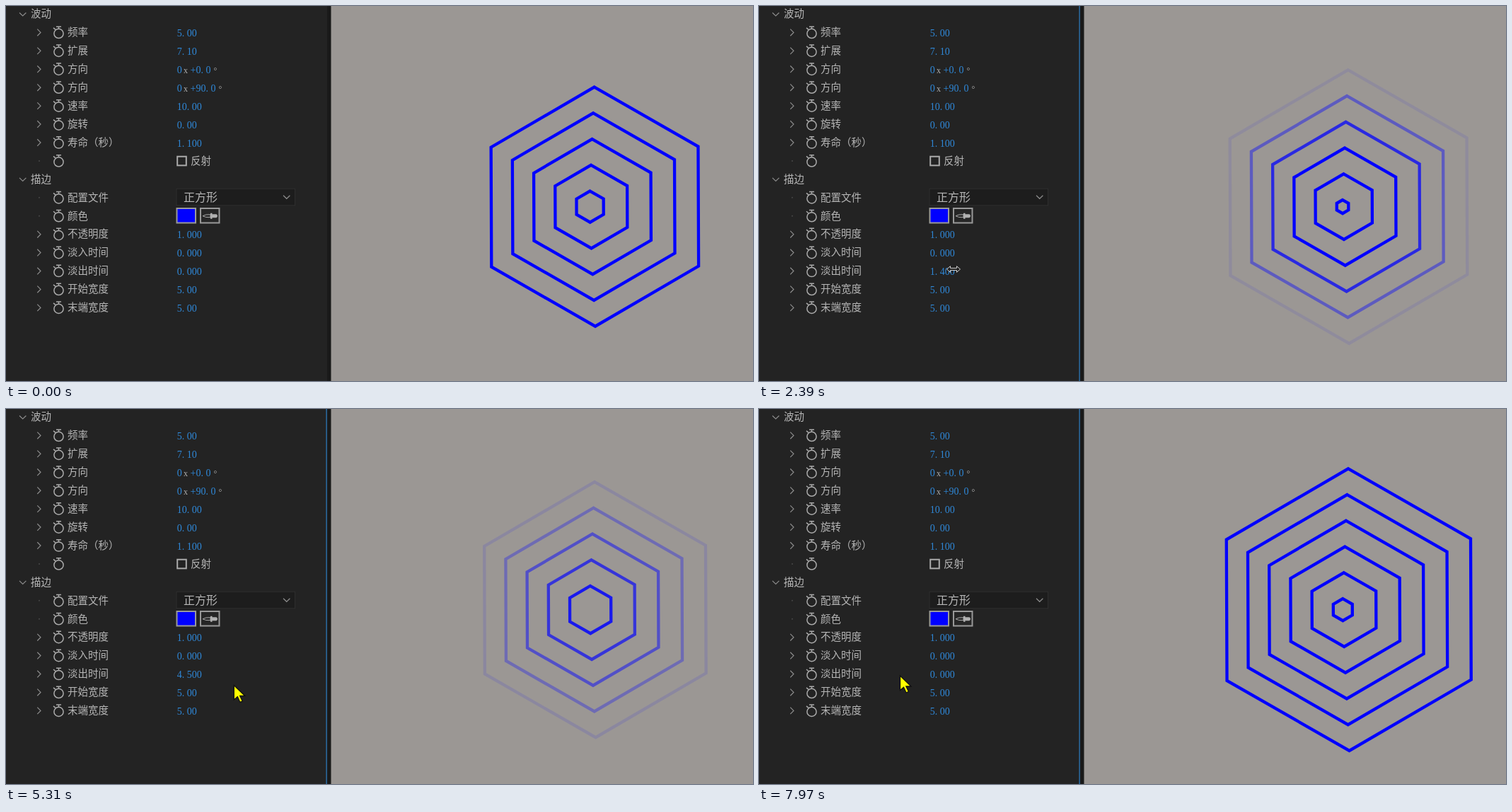
Animation of 1056 by 530 pixels, one loop 8000 ms. Source, as an HTML page:

```html
<!DOCTYPE html>
<html lang="zh-CN">
<head>
<meta charset="utf-8">
<title>波动与描边</title>
<style>
  html, body { margin: 0; width: 100%; height: 100%; overflow: hidden; background: #232323; }
  svg { display: block; width: 1056px; height: 530px; }
  text { font: 300 14.5px "Noto Sans CJK SC", "Noto Sans CJK", sans-serif; fill: #b6b6b6; white-space: pre; }
  .value { font: 14px "Liberation Serif", serif; fill: #2f88d8; }
  .unit { font: 12px "Liberation Serif", serif; fill: #b0b0b0; }
  .dot { letter-spacing: 3.5px; }
  .menu { font-size: 16px; }
  .hover { fill: #f2f2f2; }
  .icon { fill: none; stroke: #aaa; stroke-width: 1.5; }
  .chevron { fill: none; stroke: #8c8c8c; stroke-width: 1.2; }
  .box { stroke: #999; stroke-width: 2; }
  .ring { fill: none; stroke: #00f; stroke-width: 4.3; }
</style>
</head>
<body>
<svg viewBox="0 0 1056 530">
  <rect width="1056" height="530" fill="#232323"/>
  <rect x="454" width="6" height="530" fill="#191919"/>
  <rect x="459.5" width="597" height="530" fill="#9b9794"/>
  <rect id="focus" x="452.5" width="1.2" height="530" fill="#2d7fc4"/>
  <g id="rows"></g>
  <g id="rings"></g>
  <g id="arrow">
    <path d="M0 0V20.5L5 16.2L8.6 24L12 22.4L8.4 15H15.5Z" fill="#ff0" stroke="#111" stroke-width="1.3"/>
  </g>
  <g id="hand">
    <path d="M-6 0L-10 4L-6 8M6 0L10 4L6 8" fill="none" stroke="#8a8a8a" stroke-width="1.4"/>
    <path d="M-2 1Q0-2 2 1L4 8L11 9Q13 10 13 13L12 18L10 23H2L-6 15Q-8 12-5 12L0 14Z" fill="#fff" stroke="#222"/>
    <path d="M5 9V13M8.5 9.5V13" stroke="#777" stroke-width=".8"/>
  </g>
  <g id="resize">
    <path d="M-9.5 0L-4.5-4.3V-1.5H4.5V-4.3L9.5 0L4.5 4.3V1.5H-4.5V4.3Z" fill="#202020" stroke="#d0d0d0"/>
  </g>
</svg>
<script>
const LOOP = 8000;
const byId = id => document.getElementById(id);
const clamp = (v, lo, hi) => Math.max(lo, Math.min(hi, v));

// Settings panel
const ROWS = [
  ['波动'], ['频率', '5.00'], ['扩展', '7.10'], ['方向', '+0.0'], ['方向', '+90.0'],
  ['速率', '10.00'], ['旋转', '0.00'], ['寿命（秒）', '1.100'], ['', 'check'],
  ['描边'], ['配置文件', 'menu'], ['颜色', 'swatch'], ['不透明度', '1.000'],
  ['淡入时间', '0.000'], ['淡出时间', '0.000', 'fade'], ['开始宽度', '5.00'], ['末端宽度', '5.00']
];

const label = (x, y, s, cls = '') => `<text x="${x}" y="${y + 4.8}" class="${cls}">${s}</text>`;
const digits = s => s.replace('.', '<tspan class="dot">.</tspan>');
const number = (x, y, s, id = '') =>
  `<text x="${x}" y="${y + 5.8}" class="value" id="${id}">${digits(s)}</text>`;
const line = (d, cls) => `<path d="${d}" class="${cls}"/>`;
const box = (x, y, fill) =>
  `<rect x="${x}" y="${Math.round(y) - 11}" width="26.5" height="20.5" fill="${fill}" class="box"/>`;
const down = (x, y) => line(`M${x} ${y}l4.7 4.5l4.7-4.5`, 'chevron');

const stopwatch = y =>
  `<circle cx="74.5" cy="${y + 1.5}" r="6.6" class="icon"/>` +
  line(`M71 ${y - 8.3}h7M74.5 ${y - 8}v3M67 ${y - 6.5}l3 2.5`, 'icon');

const controls = {
  check: y => `<rect x="242.2" y="${y - 6.2}" width="12.6" height="12.6" class="icon" style="stroke-width:2"/>` +
    label(261, y, '反射'),
  menu: y => `<rect x="241" y="${y - 12.5}" width="167.5" height="23.5" fill="#1d1d1d" stroke="#2e2e2e"/>` +
    label(251, y + .6, '正方形', 'menu') + down(392, y - 3),
  swatch: y => box(241.5, y, '#00f') + box(275, y, '#262626') +
    `<path d="M278 ${y}q4-2.5 11-2v4q-7 .5-11-2z" fill="none" stroke="#aaa"/>` +
    `<path d="M289 ${y - 4}h2.5v1.5h6q3 2.5 0 5h-6v1.5h-2.5z" fill="#b0b0b0"/>`
};

const angle = (y, s) => number(241.7, y, '0') +
  `<text x="251" y="${y + 6}" class="unit">x</text>` + number(260.5, y, s) +
  `<text x="${265.5 + 7 * s.length}" y="${y + 5.3}" class="unit">°</text>`;

function rowMarkup([name, value, id], i) {
  const y = 11.5 + 25.93 * i;
  if (!value) return down(19, y - 2) + label(35, y, name);
  const control = controls[value];
  const marker = control
    ? `<circle cx="47" cy="${y}" r="1" fill="#484848"/>`
    : line(`M44.3 ${y - 4.8}l4.7 4.8l-4.7 4.8`, 'chevron');
  const field = control ? control(y)
    : value[0] === '+' ? angle(y, value) : number(241.7, y, value, id);
  return marker + stopwatch(y) + label(87, y, name) + field;
}
byId('rows').innerHTML = ROWS.map(rowMarkup).join('');

// The screen refreshes in even steps, with a few stalls while the value is dragged
const STEP = 47, STALL = 145, STALLS = [2850, 3040, 3680, 3830];
const RESUME = STALLS.at(-1) + STALL;

function refreshTime(t) {
  if (t < 30) return 0;
  const stall = STALLS.find(s => t >= s && t < s + STALL);
  if (stall) return stall;
  const start = t < RESUME ? 30 : RESUME - 5;
  return start + Math.floor((t - start) / STEP) * STEP;
}

// Pointer path: each shape holds until the next entry
const PRESS = 1900, RELEASE = 4790, PRESS_AGAIN = 6000;
const PATH = [
  { t: 520, x: 364, y: 505, shape: 'arrow' },
  { t: 830, x: 257, y: 368, shape: 'hand' },
  { t: PRESS, x: 257, y: 370, shape: 'resize' },
  { t: 2380, x: 275, y: 372, shape: 'resize' },
  { t: 3190, x: 285, y: 372, shape: 'resize' },
  { t: 3680, x: 314.5, y: 372, shape: 'resize' },
  { t: RELEASE, x: 314.5, y: 372, shape: 'arrow' },
  { t: 5050, x: 368, y: 388, shape: 'arrow' },
  { t: 5290, x: 321.5, y: 390.5, shape: 'arrow' },
  { t: 5540, x: 261, y: 369, shape: 'hand' },
  { t: PRESS_AGAIN, x: 261, y: 370, shape: 'resize' },
  { t: 6850, x: 200, y: 376.5, shape: 'resize' },
  { t: 7500, x: 199.5, y: 377, shape: 'arrow' }
];

function pointerAt(t) {
  const i = PATH.findLastIndex(p => p.t <= t);
  if (i < 0) return { ...PATH[0], shape: '' };
  const a = PATH[i], b = PATH[i + 1] || a;
  const k = b === a ? 0 : (t - a.t) / (b.t - a.t);
  return { x: a.x + (b.x - a.x) * k, y: a.y + (b.y - a.y) * k, shape: a.shape };
}

// Dragging changes the fade time in proportion to the distance
const PER_PIXEL = .0785, TOP = 4.5;
function fadeTime(t) {
  if (t < PRESS) return 0;
  const { x } = pointerAt(t);
  if (t < RELEASE) return clamp((x - 257) * PER_PIXEL, 0, TOP);
  if (t < PRESS_AGAIN) return TOP;
  return clamp(TOP + (x - 261) * PER_PIXEL, 0, TOP);
}

// Hexagonal waves
const LIFE = 1.1, RATE = 5, GROWTH = 36.75, PREVIEW_DELAY = 270;
const rings = Array.from({ length: 6 }, () => {
  const p = document.createElementNS('http://www.w3.org/2000/svg', 'polygon');
  p.setAttribute('class', 'ring');
  byId('rings').append(p);
  return p;
});

function hexagon(r) {
  const cx = 824.6 + r * .046, cy = 283.6, tilt = -.0038;
  return Array.from({ length: 6 }, (_, i) => {
    const a = tilt + i * Math.PI / 3;
    return `${(cx + r * Math.sin(a)).toFixed(2)},${(cy - r * Math.cos(a)).toFixed(2)}`;
  }).join(' ');
}

// Playback slips at the first press and catches up by the end
function wavesEmitted(t) {
  const slip = t < PRESS ? 0 : .24 * (LOOP - t) / (LOOP - 2380);
  return .6 + RATE * t / 1000 - slip;
}

function drawRings(t) {
  const newest = wavesEmitted(t) % 1;
  const fade = Math.min(LIFE, fadeTime(t - PREVIEW_DELAY));
  rings.forEach((ring, i) => {
    const age = newest + i;
    const left = LIFE - age / RATE;
    const alpha = left <= 0 ? 0 : fade > 0 ? Math.min(1, left / fade) : 1;
    ring.setAttribute('points', hexagon(age * GROWTH));
    ring.setAttribute('opacity', alpha);
  });
}

function drawPanel(t) {
  const { x, y, shape } = pointerAt(t);
  for (const id of ['arrow', 'hand', 'resize']) {
    byId(id).setAttribute('display', id === shape ? 'inline' : 'none');
    byId(id).setAttribute('transform', `translate(${x} ${y})`);
  }
  byId('fade').innerHTML = digits(fadeTime(t).toFixed(1) + '00');
  byId('fade').classList.toggle('hover', shape === 'hand');
  byId('focus').setAttribute('display', t >= PRESS ? 'inline' : 'none');
}

const begin = performance.now();
function draw() {
  const t = refreshTime((performance.now() - begin) % LOOP);
  drawRings(t);
  drawPanel(t);
  requestAnimationFrame(draw);
}
draw();
</script>
</body>
</html>
```
